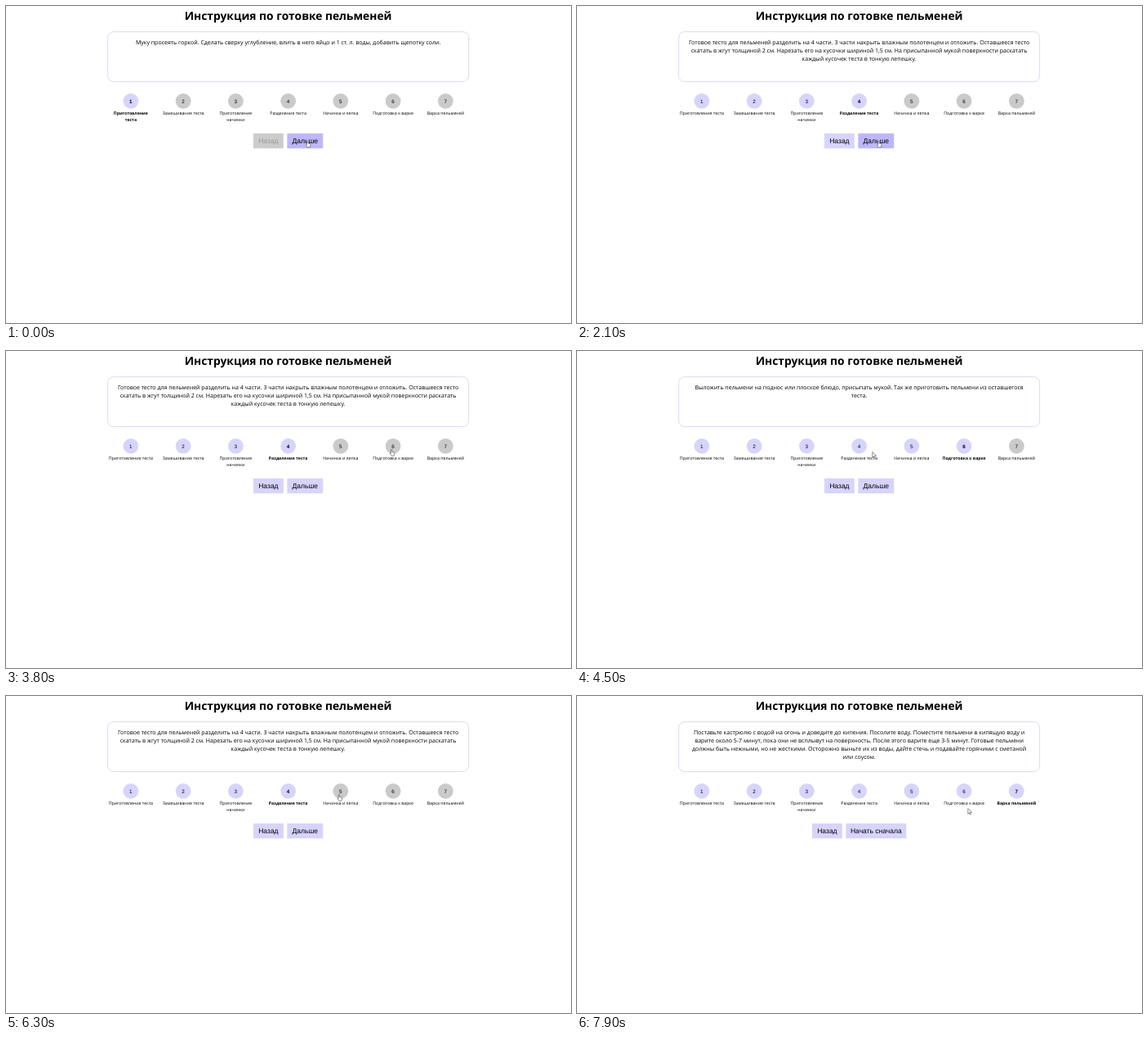
Write an HTML page that moves like this. It is 692 px wide and 388 px high and loops after 8000 ms.

```html
<!DOCTYPE html>
<html lang="ru">
<head>
<meta charset="utf-8">
<title>Инструкция</title>
<style>
html, body { margin: 0; width: 100%; height: 100%; overflow: hidden; background: #fff; }
svg { display: block; }
text { text-anchor: middle; text-rendering: geometricPrecision; font-family: "Open Sans", "Noto Sans", sans-serif; }
.title { font-size: 13.8px; font-weight: 700; }
.body { font-size: 7.03px; }
.label { font-size: 5.26px; }
.label.on { font-size: 5.13px; font-weight: 700; }
.num { font: 6.3px "Liberation Sans", Arial, sans-serif; }
.num.on { font-weight: 700; }
.btn { font: 8.5px "Liberation Sans", Arial, sans-serif; }
.cursor { fill: #fff; stroke: #444; stroke-width: .6; stroke-linejoin: round; }
</style>
</head>
<body>
<svg id="stage" width="692" height="388" viewBox="0 0 692 388"></svg>
<script>
const LOOP = 8000, TICK = 100, MID = 345.6;
const DOT_Y = 116.3, DOT_R = 9.4, DOT_GAP = 64.25;
const BTN_Y = 156, BTN_H = 18.3, BTN_GAP = 4.5;
const LILAC = '#d7d4fc', HOVER = '#bdb7fa', GREY = '#cacaca';

// Each step: label, body lines
const steps = [
  ['Приготовление теста',
    'Муку просеять горкой. Сделать сверху углубление, влить в него яйцо и 1 ст. л. воды, добавить щепотку соли.'],
  ['Замешивание теста',
    'Замесить тесто. Оно должно быть упругим и эластичным. Если тесто прилипает к рукам, добавить еще|немного муки. Накрыть тесто полотенцем и оставить на 30 минут.'],
  ['Приготовление начинки',
    'Пока расстаивается тесто, приготовить начинку для пельменей. Лук и чеснок очистить и очень мелко порубить. Смешать|говяжий и свиной фарш, добавить лук с чесноком, посолить, поперчить. Тщательно перемешать до однородности.'],
  ['Разделение теста',
    'Готовое тесто для пельменей разделить на 4 части. 3 части накрыть влажным полотенцем и отложить. Оставшееся тесто|скатать в жгут толщиной 2 см. Нарезать его на кусочки шириной 1,5 см. На присыпанной мукой поверхности раскатать|каждый кусочек теста в тонкую лепешку.'],
  ['Начинка и лепка',
    'Выложить в центр каждой лепешки по 1,5 ч. л. начинки, сложить кружок с начинкой пополам так, чтобы получился|полумесяц. Соединить концы полумесяца и скрепить их. Плотно прижать пальцами, чтобы пельмени не разваливались|при варке.'],
  ['Подготовка к варке',
    'Выложить пельмени на поднос или плоское блюдо, присыпать мукой. Так же приготовить пельмени из оставшегося|теста.'],
  ['Варка пельменей',
    'Поставьте кастрюлю с водой на огонь и доведите до кипения. Посолите воду. Поместите пельмени в кипящую воду и|варите около 5-7 минут, пока они не всплывут на поверхность. После этого варите еще 3-5 минут. Готовые пельмени|должны быть нежными, но не жесткими. Осторожно выньте их из воды, дайте стечь и подавайте горячими с сметаной|или соусом.']
];

const dotX = i => MID + (i - 3) * DOT_GAP;
const onDot = i => [dotX(i) - 1.9, DOT_Y + 4];
const onNext = [369.3, 165];

// The pointer leaves at "go", travels for "dur"; a click opens "step"
const moves = [
  { go: 2300, dur: 800, to: [425.7, 120.6] },
  { go: 3100, dur: 400, to: onDot(5), click: 4000, step: 5 },
  { go: 4200, dur: 480, to: onDot(3), click: 5300, step: 3 },
  { go: 5700, dur: 600, to: onDot(4), click: 6500, step: 4 },
  { go: 6600, dur: 750, to: onDot(6), click: 7400, step: 6 },
  { go: 7500, dur: 400, to: [478.8, 137.6] }
];
const nextClicks = [400, 1100, 2000];

const HAND = 'M-.7.6Q0-.4.7.6V3L3 3.6Q3.8 3.9 3.6 4.8L3 8H.1L-2 5.2Q-1.7 4.1-.7 5Z';
const ARROW = 'M0 0V6.6L1.5 5.3 2.5 7.7 3.6 7.2 2.6 4.9H4.7Z';

function currentStep(t) {
  const jump = moves.findLast(m => m.click <= t);
  return jump ? jump.step : nextClicks.filter(c => c <= t).length;
}

// Ease out along a slightly sagging arc
function pointer(t) {
  let [x, y] = onNext;
  for (const { go, dur, to } of moves) {
    if (t < go) break;
    const p = Math.min(1, (t - go) / dur), e = 1 - (1 - p) ** 2;
    x += (to[0] - x) * e;
    y += (to[1] - y) * e + 14 * p * (1 - p);
  }
  return [x, y];
}

const lines = (str, cls, x, y, gap) => str.split('|')
  .map((s, i) => `<text class="${cls}" x="${x}" y="${y + i * gap}">${s}</text>`).join('');

// Long labels break at the last space; bold ones sooner
const wrap = (label, bold) => label.length > (bold ? 18 : 20) ? label.replace(/ (?=\S+$)/, '|') : label;

function draw(t) {
  const cur = currentStep(t);
  const [px, py] = pointer(t);
  let hand = false;

  let out = lines('Инструкция по готовке пельменей', 'title', MID, 17.4, 0)
    + `<rect x="124.6" y="31.6" width="442" height="61" rx="7" fill="none" stroke="#d8d5f2" stroke-width=".9"/>`
    + lines(steps[cur][1], 'body', MID, 46.7, 10.05);

  steps.forEach(([label], i) => {
    const x = dotX(i), on = i === cur ? ' on' : '';
    hand ||= Math.hypot(px - x, py - DOT_Y) < DOT_R;
    out += `<circle cx="${x}" cy="${DOT_Y}" r="${DOT_R}" fill="${i <= cur ? LILAC : GREY}"/>`
      + lines(String(i + 1), 'num' + on, x, 118.5, 0)
      + lines(wrap(label, on), 'label' + on, x, 133.4, 7.4);
  });

  const end = cur === steps.length - 1;
  const buttons = [['Назад', 36.9, cur > 0], end ? ['Начать сначала', 73.9, true] : ['Дальше', 43.9, true]];
  let x = MID - (buttons[0][1] + buttons[1][1] + BTN_GAP) / 2;
  for (const [name, w, live] of buttons) {
    const over = live && px > x && px < x + w && py > BTN_Y && py < BTN_Y + BTN_H;
    hand ||= over;
    out += `<rect x="${x}" y="${BTN_Y}" width="${w}" height="${BTN_H}" fill="${over ? HOVER : live ? LILAC : '#ccc'}"/>`
      + `<text class="btn" x="${x + w / 2}" y="167.6" fill="${live ? '#000' : '#999'}">${name}</text>`;
    x += w + BTN_GAP;
  }

  return out + `<path class="cursor" transform="translate(${px} ${py})" d="${hand ? HAND : ARROW}"/>`;
}

const stage = document.getElementById('stage'), start = performance.now();
let shown = -1;
function frame() {
  const t = Math.floor((performance.now() - start) % LOOP / TICK) * TICK;
  if (t !== shown) stage.innerHTML = draw(shown = t);
  requestAnimationFrame(frame);
}
frame();
</script>
</body>
</html>
```
